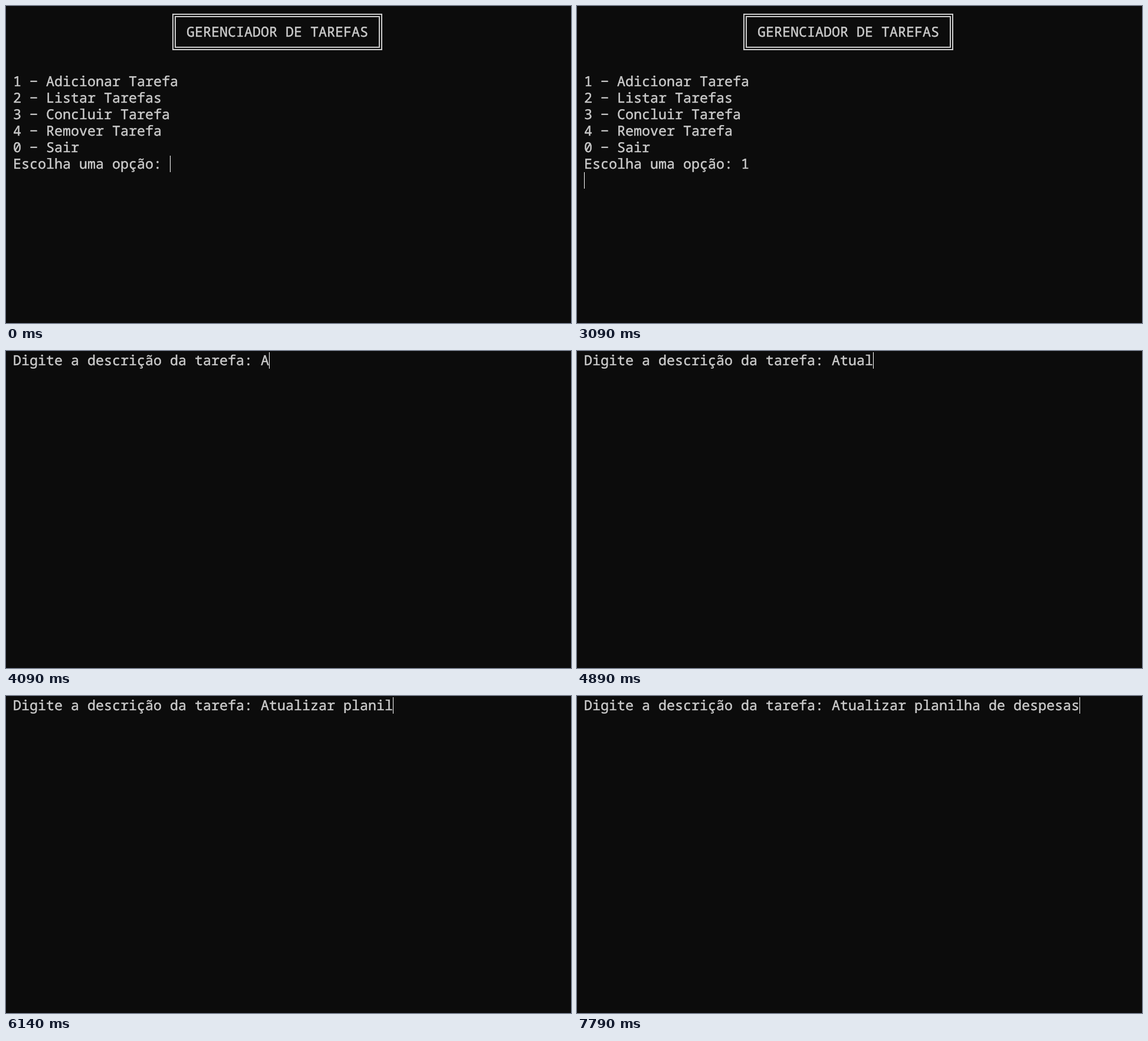
An HTML page for the animation above (8 s loop, 958 by 538 pixels).

```html
<!DOCTYPE html>
<html lang="pt-BR">
<head>
<meta charset="utf-8">
<title>Gerenciador de tarefas</title>
<style>
  html, body { margin: 0; width: 100%; height: 100%; overflow: hidden; background: #0c0c0c; }
  #screen {
    position: relative; width: 958px; height: 538px; overflow: hidden;
    color: #ccc; white-space: pre; text-rendering: geometricPrecision;
    font: calc(14px / .6)/28px "Noto Sans Mono", monospace;
    font-variant-ligatures: none; -webkit-text-stroke: .45px #ccc;
  }
  #screen div { position: absolute; }
  /* Cells are 14 x 28 px, the grid starts at 12, 2 */
  #menu, #prompt { left: 0; top: 0; }
  .line { left: calc(12px + var(--col, 0) * 14px); top: calc(1px + var(--row, 0) * 28px); }
  .frame {
    box-sizing: border-box; left: 282px; top: 13px; width: 356px; height: 62px;
    border: 2px solid #ccc; outline: 2px solid #ccc; outline-offset: -6px;
  }
  #cursor { left: 12px; top: 2px; width: 1px; height: 28px; background: #fff; }
</style>
</head>
<body>
<div id="screen">
  <div id="menu">
    <div class="frame"></div>
    <div class="line" style="--col:21;--row:1">GERENCIADOR DE TAREFAS</div>
    <div class="line" style="--row:4">1 − Adicionar Tarefa
2 − Listar Tarefas
3 − Concluir Tarefa
4 − Remover Tarefa
0 − Sair
Escolha uma opção:</div>
    <div class="line" id="choice" style="--col:19;--row:9">1</div>
  </div>
  <div id="prompt">
    <div class="line">Digite a descrição da tarefa:</div>
    <div class="line" id="typed" style="--col:30"></div>
  </div>
  <div id="cursor"></div>
</div>
<script>
  const LOOP = 8000, CELL = 14, ROW = 28;
  const CHOSEN = 2490, ENTER = 3090, CLEAR = 3160;
  const BLINK_ON = 530, BLINK = 1115;

  // Text typed at an even pace within each burst, from its first key to its last.
  const bursts = [
    { text: 'A', from: 4090, to: 4090 },
    { text: 'tualiza', from: 4500, to: 5220 },
    { text: 'r planil', from: 5350, to: 6140 },
    { text: 'ha', from: 6320, to: 6390 },
    { text: ' de de', from: 6540, to: 7050 },
    { text: 'spesas', from: 7200, to: 7790 }
  ];
  const keyTimes = bursts.flatMap(({ text, from, to }) =>
    [...text].map((_, i) => from + (to - from) * i / Math.max(1, text.length - 1)));

  const byId = id => document.getElementById(id);
  const cell = (col, row) => `translate(${col * CELL}px, ${row * ROW}px)`;
  const reveal = count => `inset(0 calc(100% - ${count * CELL}px) 0 0)`;
  const onKeys = value => keyTimes.map((time, i) => [time, value(i + 1)]);

  // Plays [time, value] pairs as hard steps; each value holds until the next.
  function play(id, property, steps) {
    const last = steps[steps.length - 1][1];
    const frames = [...steps, [LOOP, last]].map(([time, value]) => ({
      offset: time / LOOP, [property]: value, easing: 'steps(1, end)'
    }));
    byId(id).animate(frames, { duration: LOOP, iterations: Infinity });
  }

  byId('typed').textContent = bursts.map(burst => burst.text).join('');

  // Two blinks, then the cursor stays on.
  const blinks = [0, 1].flatMap(n => [[n * BLINK, 1], [n * BLINK + BLINK_ON, 0]]);

  play('menu', 'opacity', [[0, 1], [CLEAR, 0]]);
  play('prompt', 'opacity', [[0, 0], [CLEAR, 1]]);
  play('choice', 'opacity', [[0, 0], [CHOSEN, 1]]);
  play('typed', 'clipPath', [[0, reveal(0)], ...onKeys(reveal)]);
  play('cursor', 'opacity', [...blinks, [2 * BLINK, 1]]);
  play('cursor', 'transform', [
    [0, cell(19, 9)], [CHOSEN, cell(20, 9)], [ENTER, cell(0, 10)], [CLEAR, cell(30, 0)],
    ...onKeys(count => cell(30 + count, 0))
  ]);
</script>
</body>
</html>
```
